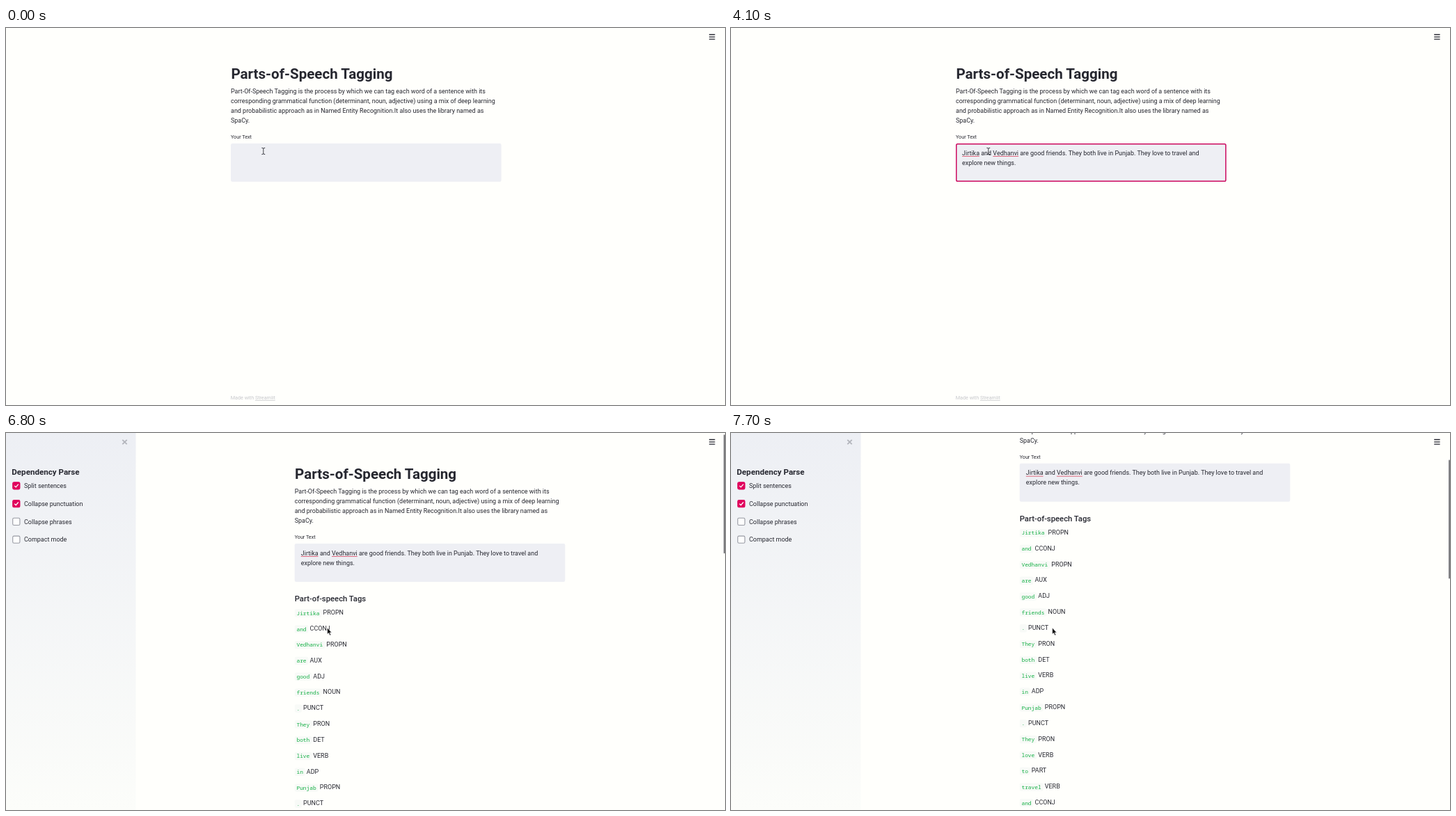
An HTML page that plays this animation: 1033x542 px, repeating every 8 s.

```html
<!DOCTYPE html>
<html lang="en">
<head>
<meta charset="utf-8">
<title>Parts-of-Speech Tagging</title>
<style>
  html, body { margin: 0; width: 100%; height: 100%; overflow: hidden; background: #fffffc; }
  svg { display: block; width: 1033px; height: 542px; }
  text { font: 8.97px Roboto, "Open Sans", sans-serif; fill: #262730; white-space: pre; }
  .title { font-size: 20.55px; font-weight: 700; }
  .side { font-size: 11.6px; font-weight: 700; }
  .head { font-size: 11.3px; font-weight: 500; }
  .small { font-size: 7.2px; }
  .pale { fill: #c6c7cb; }
  .hint { fill: #adafb8; }
  .code { font: 7.92px "Noto Sans Mono", "Liberation Mono", monospace; fill: #16b046; }
  .line { fill: none; stroke: #262730; }
</style>
</head>
<body>
<svg viewBox="0 0 1033 542">
  <defs>
    <linearGradient id="shade" x2="0" y2="1">
      <stop stop-color="#edeff4"/>
      <stop offset="1" stop-color="#fcfdfa"/>
    </linearGradient>
  </defs>

  <g id="page">
    <text class="title" x=".4" y="72.6">Parts-of-Speech Tagging</text>
    <g id="intro"></g>
    <text class="small" y="159">Your Text</text>
    <rect y="166" width="388.6" height="55" rx="2.2" fill="#eeeff4"/>
    <rect id="focus" x=".75" y="166.75" width="387.1" height="53.5" rx="1.8" fill="none" stroke="#cd0a5f" stroke-width="1.5"/>
    <g id="typed">
      <text x="9.1" y="182.7">Jirtika and Vedhanvi are good friends. They both live in Punjab. They love to travel and</text>
      <text x="9.1" y="196.7">explore new things.</text>
      <path d="M9.1 184.5h24.7M53.3 184.5h36.8" stroke="#dc5a72" stroke-width=".9"/>
    </g>
    <text id="hint" class="small hint" x="385" y="217.6" text-anchor="end">Press Ctrl+Enter to apply</text>
    <rect id="caret" width="1" height="12" fill="#262730"/>
    <g id="tags"><text class="head" y="249">Part-of-speech Tags</text></g>
  </g>

  <text id="footer" class="small pale" x="322.8" y="534">Made with <tspan text-decoration="underline">Streamlit</tspan></text>

  <g id="sidebar">
    <rect width="186.5" height="542" fill="url(#shade)"/>
    <path d="M167.3 9.8l6.4 6.4m0-6.4l-6.4 6.4" stroke="#b3b5bc" stroke-width="1.8"/>
    <text class="side" x="8.3" y="60.2">Dependency Parse</text>
    <g id="options"></g>
  </g>

  <g id="status">
    <circle cx="911.6" cy="6.6" r="1.6" fill="#97989e"/>
    <path id="runner" class="line" style="stroke:#97989e" stroke-width="1.5" stroke-linejoin="round"/>
    <text class="small" style="fill:#adafb7" x="920.8" y="15.2">RUNNING...</text>
    <rect x="963.4" y="5.4" width="35" height="14.2" rx="2.2" fill="#fff" stroke="#e1e2e6" stroke-width=".8"/>
    <text class="small" x="981" y="15" text-anchor="middle">Stop</text>
  </g>
  <path class="line" stroke-width="1.3" d="M1010.2 9.5h8.4m-8.4 3.3h8.4m-8.4 3.3h8.4"/>
  <rect id="thumb" x="1031" width="2" rx="1" fill="#808083"/>

  <g id="ibeam" class="line">
    <path stroke="#fff" stroke-width="2" opacity=".6" d="M0-4V4"/>
    <path stroke-width=".9" d="M-2.4-4.6Q0-4.8 0-3.4Q0-4.8 2.4-4.6M0-3.6V3.6M-2.4 4.6Q0 4.8 0 3.4Q0 4.8 2.4 4.6"/>
  </g>
  <path id="arrow" d="M0 0V9.2L2.1 7.4L3.6 11L5.2 10.3L3.7 6.9H6.4Z" fill="#111" stroke="#fff" stroke-width=".6"/>
</svg>

<script>
const LOOP = 8000, TICK = 100;
const el = id => document.getElementById(id);
const show = (id, on) => el(id).setAttribute('opacity', +on);
const move = (id, x, y) => el(id).setAttribute('transform', `translate(${x} ${y})`);

// Value of the latest [time, value] pair that has been reached
const at = (t, keys) => keys.filter(k => k[0] <= t).pop()[1];

el('intro').innerHTML = [
  'Part-Of-Speech Tagging is the process by which we can tag each word of a sentence with its',
  'corresponding grammatical function (determinant, noun, adjective) using a mix of deep learning',
  'and probabilistic approach as in Named Entity Recognition.It also uses the library named as',
  'SpaCy.'
].map((s, i) => `<text y="${94.4 + 14 * i}">${s}</text>`).join('');

const words = ('Jirtika PROPN,and CCONJ,Vedhanvi PROPN,are AUX,good ADJ,friends NOUN,. PUNCT,They PRON,' +
  'both DET,live VERB,in ADP,Punjab PROPN,. PUNCT,They PRON,love VERB,to PART,travel VERB,and CCONJ').split(',');
el('tags').innerHTML += words.map((pair, i) => {
  const [word, tag] = pair.split(' '), y = 268.3 + 22.83 * i, w = word.length * 4.752 + 5.4;
  return `<g class="row"><rect y="${y - 8}" width="${w}" height="11.4" rx="2" fill="#f8faf7"/>
    <text class="code" x="2.7" y="${y + .5}">${word}</text>
    <text x="${w + 2.2}" y="${y}">${tag}</text></g>`;
}).join('');
const rows = document.querySelectorAll('.row');

el('options').innerHTML = ['Split sentences', 'Collapse punctuation', 'Collapse phrases', 'Compact mode']
  .map((label, i) => {
    const y = 75.7 + 25.8 * i, on = i < 2;
    return `<rect x="9.7" y="${y - 5}" width="10.2" height="10.2" rx="1.8" stroke-width="1.1"
      fill="${on ? '#e0005c' : '#fefefe'}" stroke="${on ? '#e0005c' : '#989aa3'}"/>
      ${on ? `<path d="M12.2 ${y + .2}l2 2l3.6-4.2" fill="none" stroke="#fff" stroke-width="1.3"/>` : ''}
      <text x="26" y="${y + 3.3}">${label}</text>`;
  }).join('');

const strides = [
  'M910.6 9L908.6 13L911.6 14.6L910.8 18M908.6 13L907 15.4L903.6 15.8M906 11L907.6 8.8L910.6 9L912 11.2L914.6 11',
  'M910.6 9L908.8 13L910.2 15.4L908 18M908.8 13L911.4 14.4L912 17.6M907.2 12L908 9.4L910.6 9L911 12L913 12.6'
];

function draw(t) {
  const tagged = t >= 4700;
  const open = at(t, [[0, 0], [5600, .5], [5700, .85], [5800, 1]]);
  const scroll = at(t, [[0, 0], [6700, 2], [6800, 7], [6900, 14], [7000, 23.4],
    [7100, 45], [7200, 61], [7600, 92], [7700, 122.3]]);
  const left = tagged ? 321.2 + 93.5 * open : 323;

  move('page', left, -scroll);
  move('sidebar', -187 * (1 - open), 0);
  show('sidebar', open > 0);
  show('footer', !tagged);

  show('focus', at(t, [[0, 0], [1300, 1], [6300, .6], [6400, .25], [6500, 0]]));
  show('typed', t >= 2300);
  show('hint', t >= 2300 && t < 3200);
  show('caret', at(t, [[0, 0], [1300, 1], [1500, 0], [2100, 1], [2900, 0], [3500, 1],
    [4100, 0], [4700, 1], [5600, 0], [6000, 1], [6300, 0]]));
  if (t < 2300) move('caret', 8.2, 174);
  else move('caret', 86.5, 187);

  show('tags', tagged);
  const count = (t - 4600) / TICK * 4;
  rows.forEach((r, i) => r.setAttribute('opacity', +(i < count)));

  show('status', at(t, [[0, 0], [4200, .5], [4500, 1], [5600, 0]]));
  const stride = at(t, [[0, 1], [4500, 0], [4800, 1], [4900, 0], [5000, 1], [5100, 0]]);
  el('runner').setAttribute('d', strides[stride]);

  show('thumb', tagged);
  el('thumb').setAttribute('height', open ? 171 : 337);
  el('thumb').setAttribute('y', scroll * 542 / 1718);

  const [x, y] = at(t, [[0, [369.8, 177]], [5600, [396, 208]], [5700, [442, 258]], [5800, [461.6, 280]]]);
  move('ibeam', x, y);
  move('arrow', x, y);
  show('ibeam', t < 5700);
  show('arrow', t >= 5700);
}

let start, last;
function frame(now) {
  start ??= now;
  const t = Math.floor((now - start) % LOOP / TICK) * TICK;
  if (t !== last) draw(last = t);
  requestAnimationFrame(frame);
}
draw(0);
requestAnimationFrame(frame);
</script>
</body>
</html>
```
